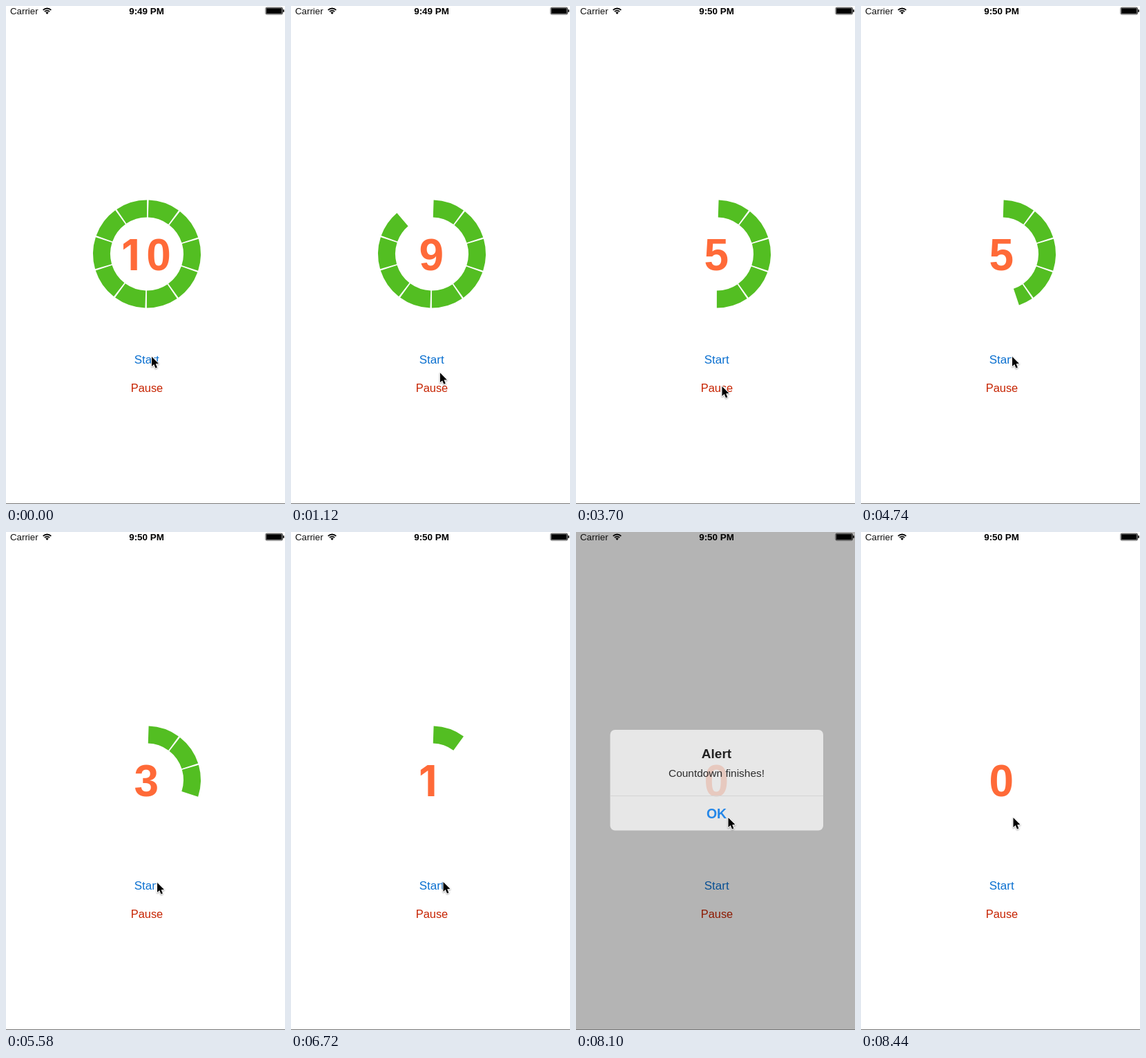
Animation, 404 px wide and 720 px high, one loop 8.46 s. Source, as an HTML page with a canvas:

```html
<!DOCTYPE html>
<html lang="en">
<head>
<meta charset="utf-8">
<title>Countdown</title>
<style>
html, body { margin: 0; width: 100%; height: 100%; overflow: hidden; background: #fff; }
canvas { display: block; width: 404px; height: 720px; }
</style>
</head>
<body>
<canvas id="stage"></canvas>
<script>
const W = 404, H = 720, LOOP = 8460;
const SANS = '"Liberation Sans", Arial, sans-serif';
const RING = { x: 204, y: 358.5, outer: 78, inner: 53, offset: 1, gap: 0.9 };
const STEP = 570, START = 228, PAUSE = 3250, RESUME = 4300, DONE = 7150, DISMISS = 8130;

const canvas = document.getElementById('stage');
const ctx = canvas.getContext('2d');
const scale = window.devicePixelRatio || 1;
canvas.width = W * scale;
canvas.height = H * scale;

const clamp = v => Math.max(0, Math.min(1, v));
const smooth = v => { v = clamp(v); return v * v * (3 - 2 * v); };
const lerp = (a, b, k) => a + (b - a) * k;

// time, x, y of the pointer tip
const pointerPath = [
  [0, 211, 507], [400, 211, 507], [1200, 216, 531], [2400, 216, 531],
  [3050, 211.5, 550], [3850, 211.5, 550], [4220, 219, 507], [5600, 219, 507],
  [6600, 220.5, 506], [7480, 220.5, 506], [7980, 220.5, 413], [LOOP, 220.5, 413]
];

function pointerAt(t) {
  const i = pointerPath.findIndex(p => p[0] > t);
  const a = pointerPath[i - 1], b = pointerPath[i];
  const k = smooth((t - a[0]) / (b[0] - a[0]));
  return [lerp(a[1], b[1], k), lerp(a[2], b[2], k)];
}

function remaining(t) {
  if (t < START) return 10;
  if (t < PAUSE) return Math.max(4.8, 10 - (t - START) / STEP);
  if (t < RESUME) return 5;
  return Math.max(0, 5 - (t - RESUME) / STEP);
}

function text(str, x, y, size, color, weight = 'normal', align = 'center') {
  ctx.font = `${weight} ${size}px ${SANS}`;
  ctx.fillStyle = color;
  ctx.textAlign = align;
  ctx.fillText(str, x, y);
}

function statusBar(t) {
  text('Carrier', 6, 12, 13.3, '#111', 'normal', 'left');
  text(t < 2900 ? '9:49 PM' : '9:50 PM', 203.5, 12, 13.4, '#000', 'bold');

  ctx.strokeStyle = ctx.fillStyle = '#000';
  ctx.lineWidth = 1.8;
  const from = -Math.PI * 0.75, to = -Math.PI * 0.25;
  for (const r of [8.2, 5.1]) {
    ctx.beginPath();
    ctx.arc(59.5, 11.7, r, from, to);
    ctx.stroke();
  }
  ctx.beginPath();
  ctx.moveTo(59.5, 11.9);
  ctx.arc(59.5, 11.7, 3, from, to);
  ctx.fill();

  ctx.lineWidth = 0.8;
  ctx.beginPath();
  ctx.roundRect(376, 2.2, 24.5, 9.8, 1.6);
  ctx.stroke();
  ctx.fillRect(377, 3.2, 22.5, 7.8);
  ctx.beginPath();
  ctx.roundRect(401.2, 5, 1.6, 4, 0.8);
  ctx.fill();
}

function segment(index, part) {
  const rad = deg => (deg - 90) * Math.PI / 180;
  const a = 36 * index + RING.offset + RING.gap;
  const b = a + (36 - 2 * RING.gap) * part;
  ctx.beginPath();
  ctx.arc(RING.x, RING.y, RING.outer, rad(a), rad(b));
  ctx.arc(RING.x, RING.y, RING.inner, rad(b), rad(a), true);
  ctx.closePath();
  ctx.fill();
}

function ring(value) {
  const count = Math.ceil(value);
  const phase = count - value;
  ctx.fillStyle = '#53be22';
  for (let i = 0; i < count; i++) {
    const last = i === count - 1;
    segment(i, last ? 1 - clamp((phase - 0.5) / 0.5) : 1);
  }
}

// Footless numeral one, aligned inside a cell centred on x
function one(x, y) {
  ctx.font = 'bold 61.5px Inter, sans-serif';
  ctx.textAlign = 'left';
  ctx.fillText('1', x + 4.7 - ctx.measureText('1').actualBoundingBoxRight, y);
}

function counter(value) {
  const n = Math.ceil(value), color = '#ff6a38', y = 381.5, x = 203.3;
  ctx.fillStyle = color;
  if (n === 10) {
    one(x - 17.8, y);
    text('0', x + 17.8, y, 64, color, 'bold');
  } else if (n === 1) {
    one(x, y);
  } else {
    text(String(n), x, y, 64, color, 'bold');
  }
}

function alertBox(t) {
  const shown = smooth((t - DONE) / 200) * (1 - smooth((t - DISMISS) / 200));
  if (shown <= 0) return;
  ctx.fillStyle = `rgba(0,0,0,${0.295 * shown})`;
  ctx.fillRect(0, 0, W, H);

  ctx.save();
  ctx.globalAlpha = shown;
  if (t < DISMISS) {
    const zoom = 1.2 - 0.2 * shown;
    ctx.translate(204, 358.5);
    ctx.scale(zoom, zoom);
    ctx.translate(-204, -358.5);
  }
  ctx.fillStyle = 'rgba(252,252,252,0.71)';
  ctx.beginPath();
  ctx.roundRect(49.5, 286, 308.5, 145.5, 7);
  ctx.fill();
  ctx.fillStyle = '#d4d4d4';
  ctx.fillRect(49.5, 381, 308.5, 1);
  text('Alert', 203.5, 327, 19, '#222', 'bold');
  text('Countdown finishes!', 203.5, 354, 15.45, '#2c2c2c');
  text('OK', 203.5, 414, 19.5, '#2587e8', 'bold');
  ctx.restore();
}

function pointer(x, y) {
  ctx.save();
  ctx.translate(x, y);
  ctx.beginPath();
  ctx.moveTo(0, 0);
  ctx.lineTo(0, 14);
  ctx.lineTo(3.2, 11.1);
  ctx.lineTo(5.5, 16.4);
  ctx.lineTo(7.9, 15.4);
  ctx.lineTo(5.7, 10.2);
  ctx.lineTo(10, 10.1);
  ctx.closePath();
  ctx.lineJoin = 'round';
  ctx.lineWidth = 2;
  ctx.strokeStyle = '#fff';
  ctx.shadowColor = 'rgba(0,0,0,0.35)';
  ctx.shadowBlur = 2 * scale;
  ctx.shadowOffsetY = scale;
  ctx.stroke();
  ctx.shadowColor = 'transparent';
  ctx.fillStyle = '#000';
  ctx.fill();
  ctx.restore();
}

function draw(t) {
  const value = remaining(t);
  ctx.setTransform(scale, 0, 0, scale, 0, 0);
  ctx.fillStyle = '#fff';
  ctx.fillRect(0, 0, W, H);
  ring(value);
  counter(value);
  text('Start', 203.7, 517, 17, '#0b70d0');
  text('Pause', 204, 558, 16.4, '#c62300');
  alertBox(t);
  statusBar(t);
  ctx.fillStyle = '#777';
  ctx.fillRect(0, 719, W, 1);
  pointer(...pointerAt(t));
}

const begin = performance.now();
function frame() {
  draw((performance.now() - begin) % LOOP);
  requestAnimationFrame(frame);
}
frame();
</script>
</body>
</html>
```
